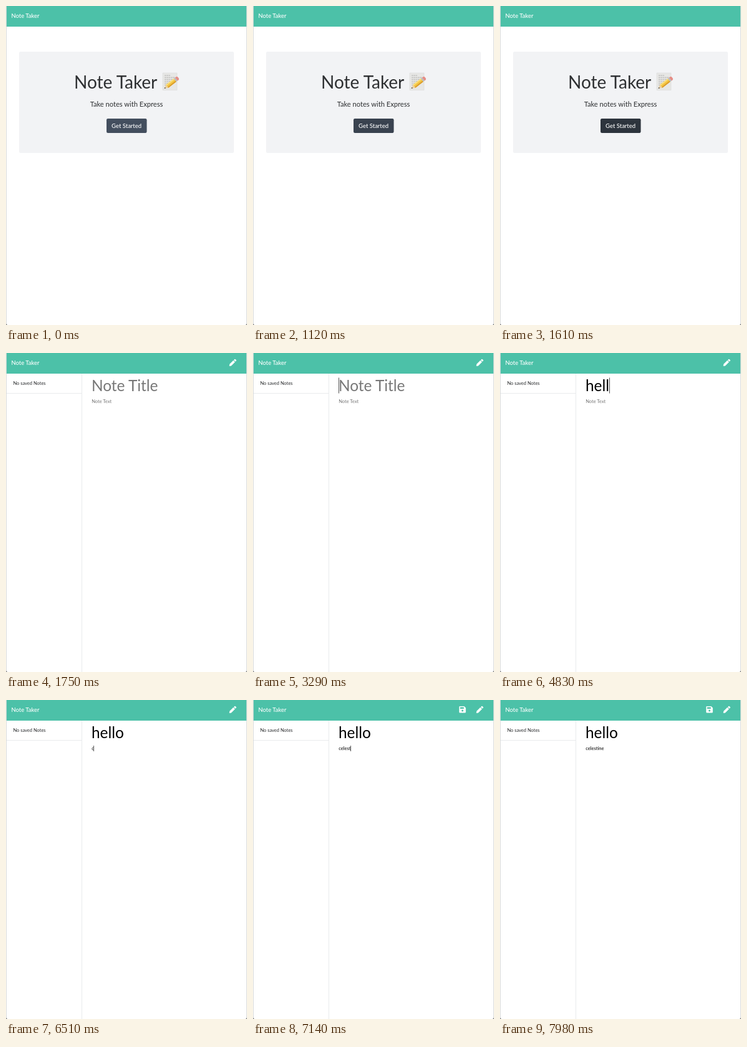
These frames come from a looping animation (386x510 px, 8000 ms). An HTML page:

```html
<!DOCTYPE html>
<html lang="en">
<head>
<meta charset="utf-8">
<title>Note Taker</title>
<style>
  html, body { margin: 0; width: 100%; height: 100%; overflow: hidden; background: #fff; }
  svg { display: block; width: 386px; height: 510px; font-family: Lato, sans-serif; }
  .white { fill: #fff; }
  .mid { text-anchor: middle; }
  .rule { fill: #e9ebed; }
  .hint { fill: #777; }
  #title { font-size: 24.4px; }
  #body { font-size: 7.5px; }
</style>
</head>
<body>
<svg viewBox="0 0 386 510">
  <rect width="386" height="510" fill="#fff"/>
  <rect x="1" width="384" height="33" fill="#4cc1a8"/>
  <text class="white" x="8.6" y="19" font-size="9.4" font-weight="500">Note Taker</text>

  <g id="home">
    <rect x="21" y="73" width="344" height="162" rx="2.5" fill="#f2f3f5"/>
    <text x="109" y="132" font-size="28" fill="#2d2f31">Note Taker</text>
    <g id="memo">
      <path d="M251 107H274V134.5H251Z" fill="#e7e7e5" stroke="#d6d6d4" stroke-width=".5"/>
      <path d="M254 111H263M254 114.2H271M254 117.2H270M254 120.2H266M254 123.2H261M254 126.2H258"
            stroke="#a9a9a9" stroke-width=".9" stroke-dasharray="2.6 .7"/>
      <g transform="translate(253.5 132) rotate(-38)">
        <path d="M0 0L6-3.2V3.2Z" fill="#ecd0a0"/>
        <path d="M0 0L2.2-1.2V1.2Z" fill="#444"/>
        <path d="M6-3.2H22V3.2H6Z" fill="#f3c443"/>
        <path d="M6-3.2H22V-1.2H6Z" fill="#fadf7c"/>
        <path d="M6 1.4H22V3.2H6Z" fill="#d99a2b"/>
        <path d="M22-3.2H24.5V3.2H22Z" fill="#b9bcc0"/>
        <path d="M24.5-3.2H26.5Q28.5-3 28.5 0T26.5 3.2H24.5Z" fill="#e58d86"/>
      </g>
    </g>
    <text class="mid" x="193" y="161" font-size="11.15" fill="#2d2f31">Take notes with Express</text>
    <rect id="button" x="161" y="180" width="64.5" height="23" rx="2.2"/>
    <text class="white mid" x="193.1" y="194.8" font-size="9.5" font-weight="500">Get Started</text>
  </g>

  <g id="notes">
    <rect class="rule" x="121" y="33" width="1" height="477"/>
    <g id="list">
      <text x="11.4" y="51.4" font-size="7.5" fill="#2a2c2e">No saved Notes</text>
      <rect class="rule" x="1" y="64" width="120" height="1"/>
    </g>
    <text id="title" x="137" y="61"></text>
    <text id="body" x="137.2" y="80.4"></text>
    <rect id="caret" width="1" fill="#555"/>
    <g transform="translate(357.6 9.4)" class="white">
      <path d="M6.6 2.4L9.2 5L3.2 11L.6 11.5Q0 11.5 .1 10.9L.6 8.4Z"/>
      <path d="M7.2 1.8L8.5 .5Q9.1 0 9.8 .5L11.1 1.8Q11.6 2.5 11.1 3.1L9.8 4.4Z"/>
    </g>
    <path id="save" class="white" fill-rule="evenodd" transform="translate(330.2 10)"
          d="M1.2 0H8L10.6 2.6V9.3Q10.6 10.5 9.4 10.5H1.2Q0 10.5 0 9.3V1.2Q0 0 1.2 0Z
             M1.5 1.5V4H7.5V1.5ZM5.3 5.6A1.5 1.5 0 1 0 5.3 8.6A1.5 1.5 0 1 0 5.3 5.6Z"/>
  </g>

  <path d="M.5 0V510M385.5 0V510" stroke="#d9dbdc"/>
  <path d="M0 507Q0 510 3 510H0ZM386 507Q386 510 383 510H386Z" fill="#555"/>
</svg>
<script>
const LOOP = 8000, OPEN = 1680, LISTED = 1750, SAVABLE = 6580;
const $ = id => document.getElementById(id);

// [time, letters typed]
const fields = {
  title: { full: 'hello', hint: 'Note Title',
           keys: [[4340, 1], [4550, 2], [4690, 3], [4830, 4], [5040, 5]] },
  body:  { full: 'celestine', hint: 'Note Text',
           keys: [[6510, 1], [6580, 2], [6720, 3], [6860, 4], [6930, 5], [7140, 6], [7280, 7], [7420, 9]] }
};
// [time, field holding the caret]
const caretSteps = [[3290, 'title'], [3850, ''], [4340, 'title'], [5250, 'body'],
                    [5740, ''], [6300, 'body'], [7980, '']];
const hover = [[1050, .2], [1120, .45], [1190, .7], [1260, .9], [1330, 1]];

const valueAt = (steps, t, start) =>
  steps.reduce((v, [at, next]) => t >= at ? next : v, start);
const show = (id, on) => $(id).setAttribute('visibility', on ? 'visible' : 'hidden');
const mix = (a, b, k) => `rgb(${a.map((v, i) => Math.round(v + (b[i] - v) * k))})`;

function drawField(id, t) {
  const { full, hint, keys } = fields[id];
  const typed = full.slice(0, valueAt(keys, t, 0));
  const el = $(id);
  el.textContent = typed || hint;
  el.setAttribute('class', typed ? '' : 'hint');
  return typed ? el.getComputedTextLength() : 0;
}

function draw(t) {
  const open = t >= OPEN;
  $('home').style.display = open ? 'none' : '';
  $('notes').style.display = open ? '' : 'none';
  $('button').setAttribute('fill', mix([67, 78, 94], [45, 52, 61], valueAt(hover, t, 0)));
  if (!open) return;

  show('list', t >= LISTED);
  show('save', t >= SAVABLE);
  const width = { title: drawField('title', t), body: drawField('body', t) };
  const focus = valueAt(caretSteps, t, '');
  show('caret', focus);
  if (!focus) return;
  const inTitle = focus === 'title';
  const caret = $('caret');
  caret.setAttribute('x', Math.round(136.8 + width[focus]));
  caret.setAttribute('y', inTitle ? 39.5 : 73);
  caret.setAttribute('height', inTitle ? 25 : 9);
}

const start = performance.now();
function tick() {
  draw((performance.now() - start) % LOOP);
  requestAnimationFrame(tick);
}
tick();
</script>
</body>
</html>
```
